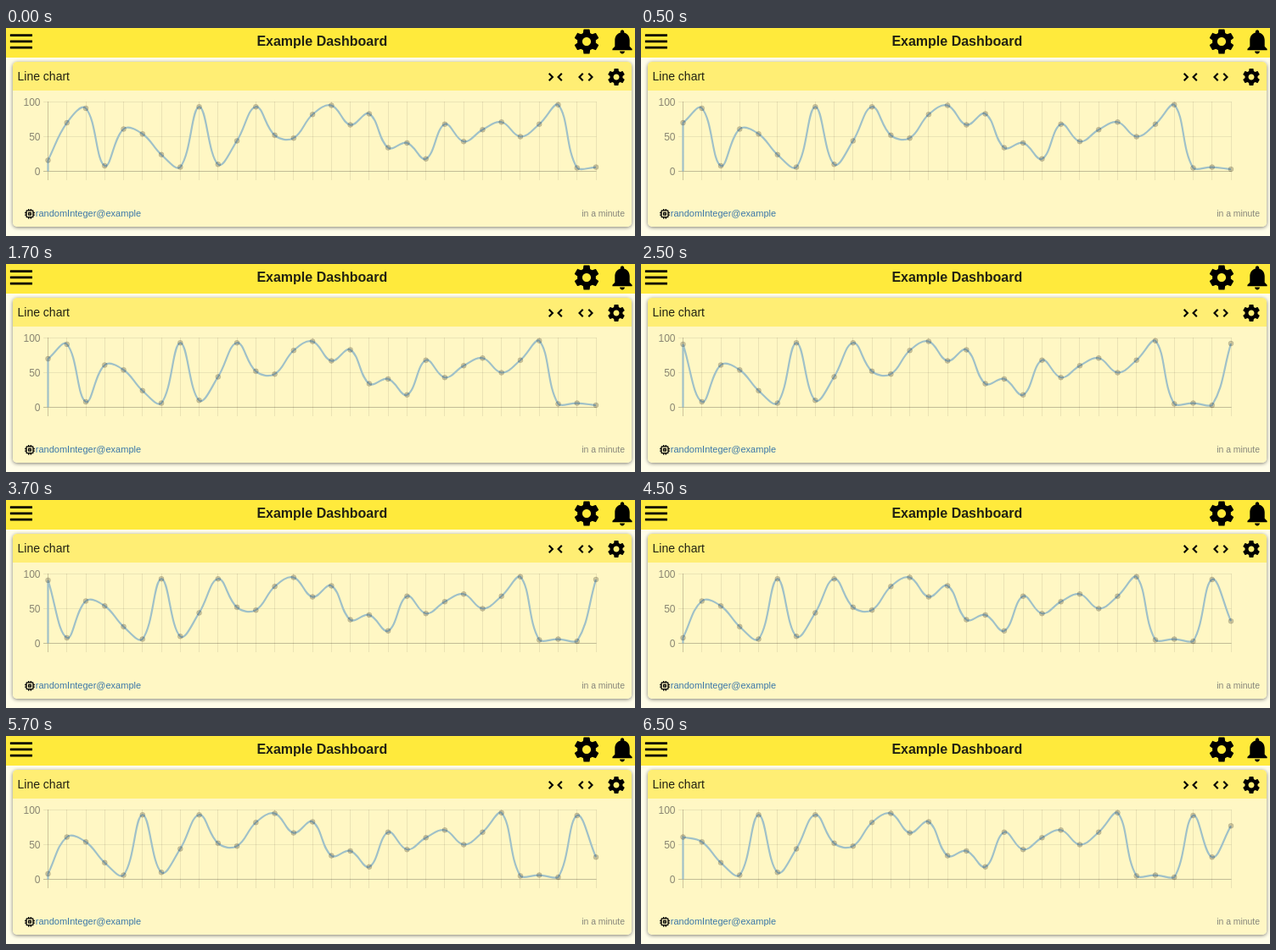
Recreate the animation shown at these times as an HTML page. Size 741 by 246 pixels, loop 8 s.

```html
<!DOCTYPE html>
<html lang="en">
<head>
<meta charset="utf-8">
<title>Example Dashboard</title>
<style>
html, body { margin: 0; width: 100%; height: 100%; overflow: hidden; background: #fffde9; }
svg { display: block; position: absolute; left: 0; top: 0; }
text { font-family: "Liberation Sans", Arial, sans-serif; fill: #212112; }
.card { position: absolute; left: 8px; top: 40px; width: 729px; height: 195px; border-radius: 5px;
  background: linear-gradient(#ffee74 34px, #fff7c4 34px); box-shadow: 0 1px 4px rgba(0,0,0,.5); }
.tick { font-size: 12px; fill: #8a8672; text-anchor: end; }
.arrows { fill: none; stroke: #000; stroke-width: 2.1; }
#line { fill: none; stroke: #a0c1c8; stroke-width: 2.2; stroke-linejoin: miter; }
#dots circle { fill: rgba(0,0,0,.2); stroke: rgba(0,0,0,.1); }
</style>
</head>
<body>
<div class="card"></div>
<svg width="741" height="246" viewBox="0 0 741 246">
  <defs>
    <path id="gear" d="M19.43 12.98c.04-.32.07-.64.07-.98s-.03-.66-.07-.98l2.11-1.65c.19-.15.24-.42.12-.64l-2-3.46c-.12-.22-.39-.3-.61-.22l-2.49 1c-.52-.4-1.08-.73-1.69-.98l-.38-2.65C14.46 2.18 14.25 2 14 2h-4c-.25 0-.46.18-.49.42l-.38 2.65c-.61.25-1.17.59-1.69.98l-2.49-1c-.23-.09-.49 0-.61.22l-2 3.46c-.13.22-.07.49.12.64l2.11 1.65c-.04.32-.07.65-.07.98s.03.66.07.98l-2.11 1.65c-.19.15-.24.42-.12.64l2 3.46c.12.22.39.3.61.22l2.49-1c.52.4 1.08.73 1.69.98l.38 2.65c.03.24.24.42.49.42h4c.25 0 .46-.18.49-.42l.38-2.65c.61-.25 1.17-.59 1.69-.98l2.49 1c.23.09.49 0 .61-.22l2-3.46c.12-.22.07-.49-.12-.64l-2.11-1.65zM12 15.5c-1.93 0-3.5-1.57-3.5-3.5s1.57-3.5 3.5-3.5 3.5 1.57 3.5 3.5-1.57 3.5-3.5 3.5z"/>
  </defs>

  <rect width="741" height="35" fill="#ffea3c"/>
  <path transform="translate(.5 -1.5) scale(1.45)" d="M3 18h18v-2H3v2zm0-5h18v-2H3v2zm0-7v2h18V6H3z"/>
  <text x="372.3" y="21" font-size="16" font-weight="bold" text-anchor="middle">Example Dashboard</text>
  <use href="#gear" transform="translate(666.6 -1.4) scale(1.45)"/>
  <path transform="translate(708.6 -1.4) scale(1.45)" d="M12 22c1.1 0 2-.9 2-2h-4c0 1.1.9 2 2 2zm6-6v-5c0-3.07-1.64-5.64-4.5-6.32V4c0-.83-.67-1.5-1.5-1.5s-1.5.67-1.5 1.5v.68C7.63 5.36 6 7.92 6 11v5l-2 2v1h16v-1l-2-2z"/>

  <text x="13.5" y="62" font-size="14">Line chart</text>
  <path class="arrows" d="M639.7 53.8l4.2 4.2-4.2 4.2M654.8 53.8l-4.2 4.2 4.2 4.2M679.7 53.8l-4.2 4.2 4.2 4.2M686.3 53.8l4.2 4.2-4.2 4.2"/>
  <use href="#gear" transform="translate(707 46)"/>

  <g id="grid"></g>
  <path id="line"/>
  <g id="dots"></g>

  <path transform="translate(20.2 212) scale(.65)" d="M15 9H9v6h6V9zm-2 4h-2v-2h2v2zm8-2V9h-2V7c0-1.1-.9-2-2-2h-2V3h-2v2h-2V3H9v2H7c-1.1 0-2 .9-2 2v2H3v2h2v2H3v2h2v2c0 1.1.9 2 2 2h2v2h2v-2h2v2h2v-2h2c1.100 0 2-.9 2-2v-2h2v-2h-2v-2h2zm-4 6H7V7h10v10z"/>
  <text x="34.800" y="223" font-size="11" style="fill:#3b78a8">randomInteger@example</text>
  <text x="729" y="223" font-size="10.4" text-anchor="end" style="fill:#87867b">in a minute</text>
</svg>
<script>
const values = [16, 70, 91, 8, 61, 54, 24, 6, 93, 10, 44, 93, 52, 48, 82, 95, 67, 83, 34, 41, 18, 68,
  43, 60, 71, 50, 68, 96, 5, 6, 3, 92, 32, 77];
const COUNT = 30, LEFT = 49.5, RIGHT = 695, TOP = 87.5, BOTTOM = 169.5, TENSION = 0.4;
const $ = id => document.getElementById(id);
const xAt = i => LEFT + (RIGHT - LEFT) * i / (COUNT - 1);
const yAt = v => BOTTOM - (BOTTOM - TOP) * v / 100;
const clamp = (v, lo, hi) => Math.min(hi, Math.max(lo, v));

function add(parent, tag, attrs) {
  const el = document.createElementNS("http://www.w3.org/2000/svg", tag);
  for (const k in attrs) el.setAttribute(k, attrs[k]);
  return parent.appendChild(el);
}

function gridLine(d, alpha) {
  add($("grid"), "path", { d, stroke: `rgba(0,0,0,${alpha})` });
}

for (let i = 0; i < COUNT; i++) {
  gridLine(`M${Math.floor(xAt(i)) + .5} ${TOP - .5}V180`, i ? .08 : .2);
}
for (const v of [0, 50, 100]) {
  const y = Math.floor(yAt(v)) + .5;
  gridLine(`M44 ${y}H695.5`, v ? .08 : .24);
  add($("grid"), "text", { class: "tick", x: 40.5, y: y + 4 }).textContent = v;
}
const dots = Array.from({ length: COUNT }, (_, i) => add($("dots"), "circle", { cx: xAt(i), r: 3 }));

// Bezier handles before and after a point, kept inside the plot.
function handles(a, p, b) {
  const d1 = Math.hypot(p.x - a.x, p.y - a.y), d2 = Math.hypot(b.x - p.x, b.y - p.y);
  const handle = k => {
    const x = clamp(p.x + k * (b.x - a.x), LEFT, RIGHT);
    const y = clamp(p.y + k * (b.y - a.y), TOP, BOTTOM);
    return `${x.toFixed(2)} ${y.toFixed(2)}`;
  };
  const sum = d1 + d2 || 1;
  return [handle(-TENSION * d1 / sum), handle(TENSION * d2 / sum)];
}

function draw(shift) {
  const pts = values.slice(shift, shift + COUNT).map((v, i) => ({ x: xAt(i), y: yAt(v) }));
  const ctl = pts.map((p, i) => handles(pts[i - 1] || p, p, pts[i + 1] || p));
  let d = `M${LEFT} ${BOTTOM}V${pts[0].y}`;
  pts.forEach((p, i) => {
    if (i) d += `C${ctl[i - 1][1]} ${ctl[i][0]} ${p.x} ${p.y}`;
    dots[i].setAttribute("cy", p.y);
  });
  $("line").setAttribute("d", d);
}

let shown = -1;
function tick() {
  const t = performance.now() % 8000;
  const shift = Math.floor((t + 1500) / 2000);
  if (shift !== shown) draw(shown = shift);
  requestAnimationFrame(tick);
}
tick();
</script>
</body>
</html>
```
